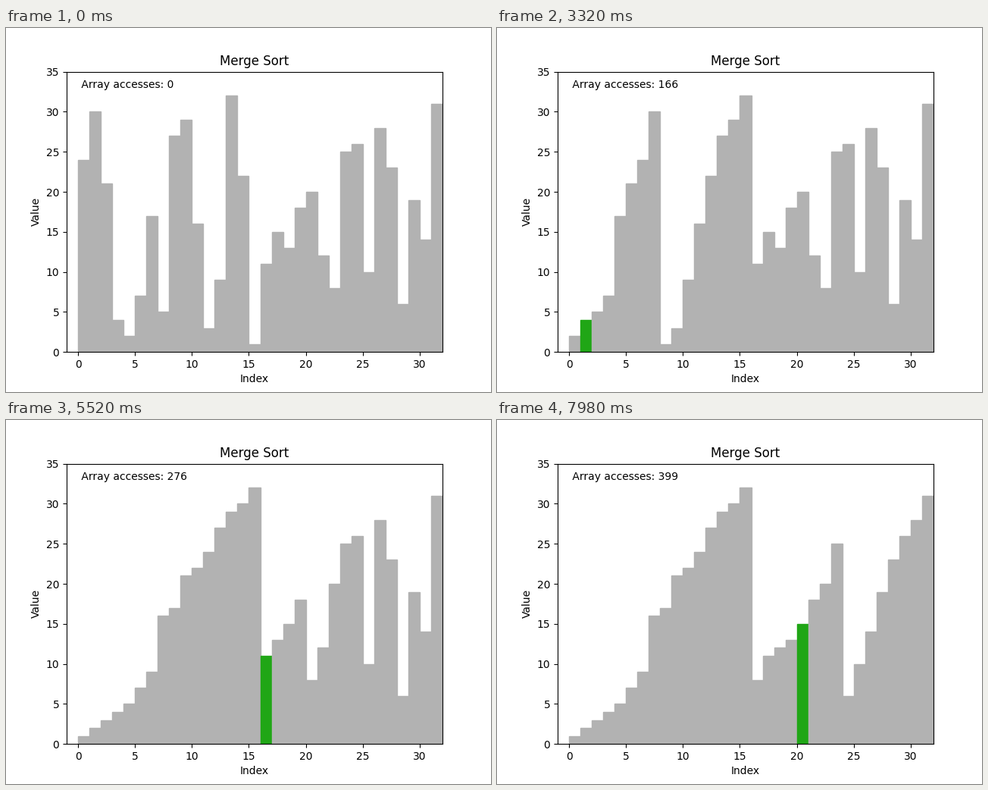
A matplotlib script that plays this animation: 640x480 px, repeating every 8000 ms.

```python
import matplotlib.pyplot as plt
from matplotlib.animation import FuncAnimation

VALUES = [24, 30, 21, 4, 2, 7, 17, 5, 27, 29, 16, 3, 9, 32, 22, 1,
          11, 15, 13, 18, 20, 12, 8, 25, 26, 10, 28, 23, 6, 19, 14, 31]
FRAMES = 400
IDLE, READ, WRITE = "#b2b2b2", "#20a616", "#b02818"


class TrackedList:
    """List that logs a snapshot of itself on every access."""

    def __init__(self, values):
        self.values = list(values)
        self.log = [(list(values), None, IDLE)]

    def __getitem__(self, i):
        self.log.append((list(self.values), i, READ))
        return self.values[i]

    def __setitem__(self, i, value):
        self.values[i] = value
        self.log.append((list(self.values), i, WRITE))


def merge_sort(a, lo, hi):
    if hi - lo < 2:
        return
    mid = (lo + hi) // 2
    merge_sort(a, lo, mid)
    merge_sort(a, mid, hi)

    merged = []
    i, j = lo, mid
    while i < mid and j < hi:
        if a[i] < a[j]:
            merged.append(a[i])
            i += 1
        else:
            merged.append(a[j])
            j += 1
    for k in [*range(i, mid), *range(j, hi)]:
        merged.append(a[k])
    for k, value in enumerate(merged, lo):
        a[k] = value


tracked = TrackedList(VALUES)
merge_sort(tracked, 0, len(VALUES))

fig, ax = plt.subplots(figsize=(6.4, 4.8), dpi=100)
bars = ax.bar(range(len(VALUES)), VALUES, width=1, align="edge",
              color=IDLE, edgecolor=IDLE, linewidth=1)
ax.set(xlim=(-1, 32), ylim=(0, 35), xlabel="Index", ylabel="Value",
       title="Merge Sort")
counter = ax.text(0, 33, "")


def update(n):
    values, active, color = tracked.log[n]
    for i, (bar, value) in enumerate(zip(bars, values)):
        bar.set_height(value)
        bar.set_color(color if i == active else IDLE)
    counter.set_text(f" Array accesses: {n}")
    return [*bars, counter]


anim = FuncAnimation(fig, update, frames=FRAMES, interval=20,
                     repeat=True, repeat_delay=0)
plt.show()
```
